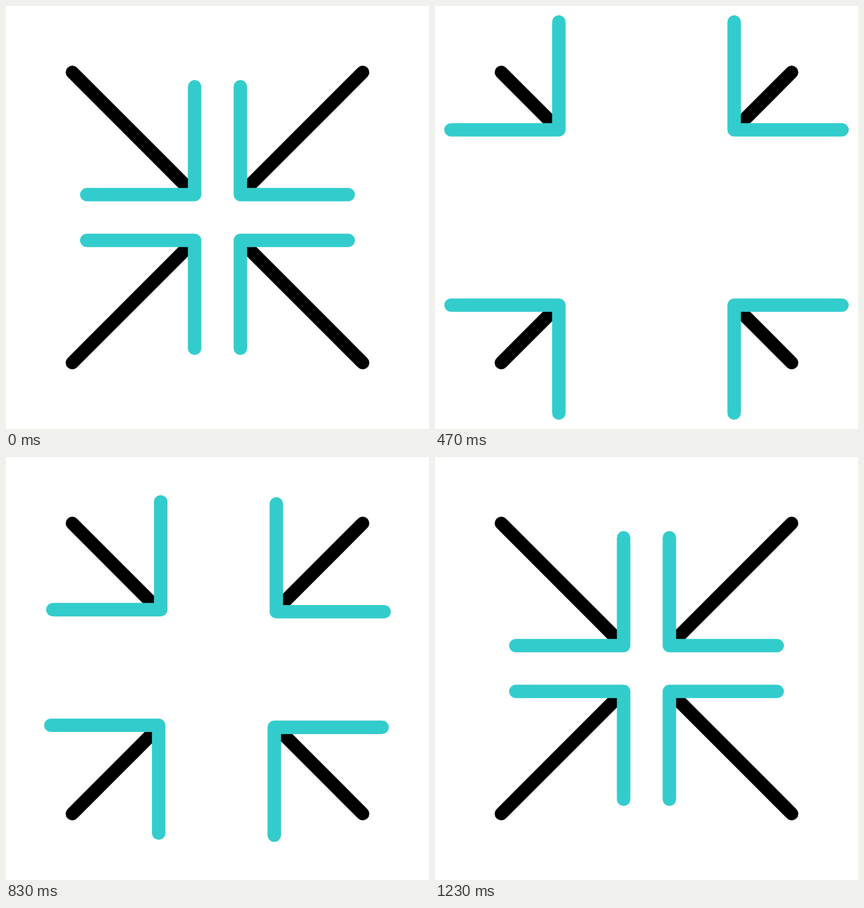
An HTML page for the animation above (2 s loop, 640x640 px).

```html
<!DOCTYPE html>
<html lang="en">
<head>
<meta charset="utf-8">
<title>Four arrows</title>
<style>
  html, body { margin: 0; width: 100%; height: 100%; overflow: hidden; background: #fff; }
  svg { display: block; width: 100%; height: 100%; }
  path { fill: none; stroke-linecap: round; stroke-linejoin: round; }
  .shaft { stroke: #000; stroke-width: 20; }
  .head { stroke: #33cccc; stroke-width: 20.4; }
</style>
</head>
<body>
<svg viewBox="-320 -320 640 640">
  <g id="arrow">
    <path class="shaft"/>
    <path class="head"/>
  </g>
  <use href="#arrow" transform="rotate(90)"/>
  <use href="#arrow" transform="rotate(180)"/>
  <use href="#arrow" transform="rotate(270)"/>
</svg>
<script>
const LOOP = 2000, RATE = 0.03;
const TAIL = 219.7, ARM = 163.2;
const REST = 34.6, REACH = 98, DECAY = 0.55, DRIFT = 1.55;

// ticks at which the arrows turn round: out, in, out, in ...
const turns = [0, 14, 20.9, 25.4, 28.8, 34, 37];
const firstPeak = turns[1], end = turns[turns.length - 1];

const shaft = document.querySelector('.shaft');
const head = document.querySelector('.head');

// cubic-bezier(.36, 0, .64, 1)
function ease(x) {
  let t = x;
  for (let i = 0; i < 8; i++) {
    const u = 1 - t;
    t += x - (1.08 * t * u * u + 1.92 * t * t * u + t * t * t);
  }
  return t * t * (3 - 2 * t);
}

// each bounce reaches a little over half as far as the one before
function distance(tick) {
  if (tick >= end) return REST;
  const i = turns.findIndex(t => t > tick) - 1;
  const p = ease((tick - turns[i]) / (turns[i + 1] - turns[i]));
  const reach = REACH * DECAY ** Math.floor(i / 2);
  return REST + reach * (i % 2 ? 1 - p : p);
}

// slight clockwise swing after the first peak
function swing(tick) {
  if (tick <= firstPeak || tick >= end) return 0;
  return DRIFT * Math.sin(Math.PI * (tick - firstPeak) / (end - firstPeak));
}

function draw(ms) {
  const tick = Math.floor((ms % LOOP) * RATE + 0.12);
  const d = distance(tick), s = swing(tick);
  const x = s - d, y = -s - d, tip = -d - 4;
  shaft.setAttribute('d', `M${-TAIL} ${-TAIL}L${tip} ${tip}`);
  head.setAttribute('d', `M${x - ARM} ${y}H${x}V${y - ARM}`);
}

const start = performance.now();
function loop() {
  draw(performance.now() - start);
  requestAnimationFrame(loop);
}
loop();
</script>
</body>
</html>
```
